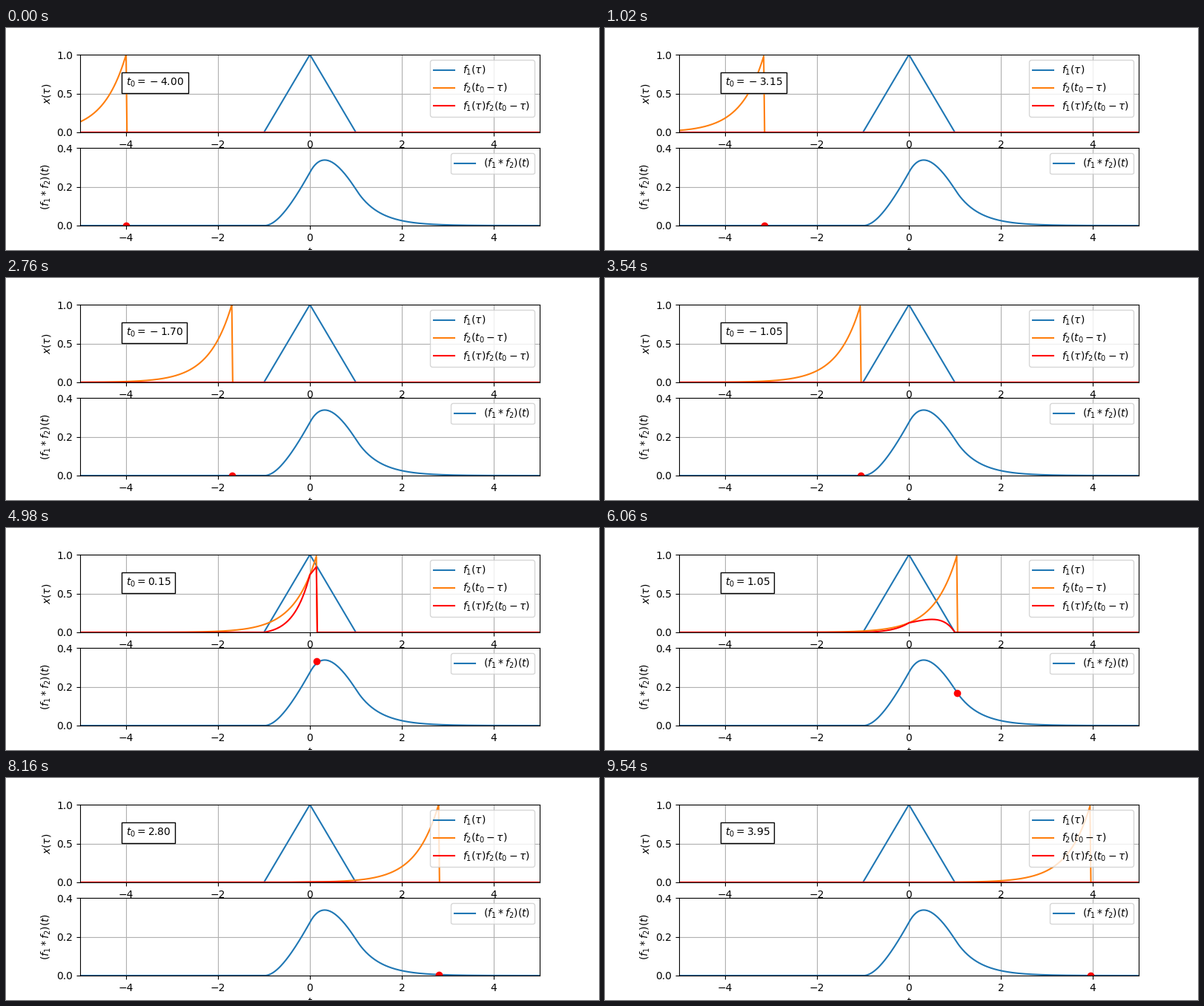
These frames come from a looping animation (800 px wide and 300 px high, 9.6 s). A matplotlib script:

```python
import numpy as np
import matplotlib.pyplot as plt
from matplotlib.animation import FuncAnimation

plt.rcParams["font.family"] = "DejaVu Sans"

STEP = 0.02
t = np.arange(-5, 5, STEP)
shifts = np.arange(-4, 4, 0.05)


def f1(x):
    return np.maximum(0, 1 - np.abs(x))


def f2(x):
    return (x > 0) * np.exp(-2 * x)


def product(shift):
    return f1(t) * f2(shift - t)


def integral(shift):
    return product(shift).sum() * STEP


def style(ax, top, yticks, ylabel):
    ax.set_xlim(-5, 5)
    ax.set_ylim(0, top)
    ax.set_xticks([-4, -2, 0, 2, 4])
    ax.set_yticks(yticks)
    ax.set_ylabel(ylabel)
    ax.grid(True)
    ax.legend(fontsize=10, loc="upper right")


fig, (upper, lower) = plt.subplots(2, 1, figsize=(8, 3), dpi=100)

upper.plot(t, f1(t), label=r"$f_1(\tau)$")
shifted, = upper.plot(t, f2(shifts[0] - t), label=r"$f_2(t_0-\tau)$")
overlap, = upper.plot(t, product(shifts[0]), "r-",
                      label=r"$f_1(\tau)f_2(t_0-\tau)$")
readout = upper.text(-4, 0.6, "", bbox=dict(fc="white"))
style(upper, 1, [0, 0.5, 1], r"$x(\tau)$")

lower.plot(t, [integral(s) for s in t], label="$(f_1*f_2)(t)$")
dot, = lower.plot([], [], "ro")
style(lower, 0.4, [0, 0.2, 0.4], "$(f_1*f_2)(t)$")
lower.set_xlabel("$t$")


def update(i):
    shift = shifts[i]
    shifted.set_ydata(f2(shift - t))
    overlap.set_ydata(product(shift))
    # adding zero after rounding avoids a negative zero in the label
    readout.set_text("$t_0=%.2f$" % (round(shift, 2) + 0.0))
    dot.set_data([shift], [integral(shift)])
    return shifted, overlap, readout, dot


anim = FuncAnimation(fig, update, frames=len(shifts), interval=60,
                     repeat=True, repeat_delay=0, blit=False)
plt.show()
```
